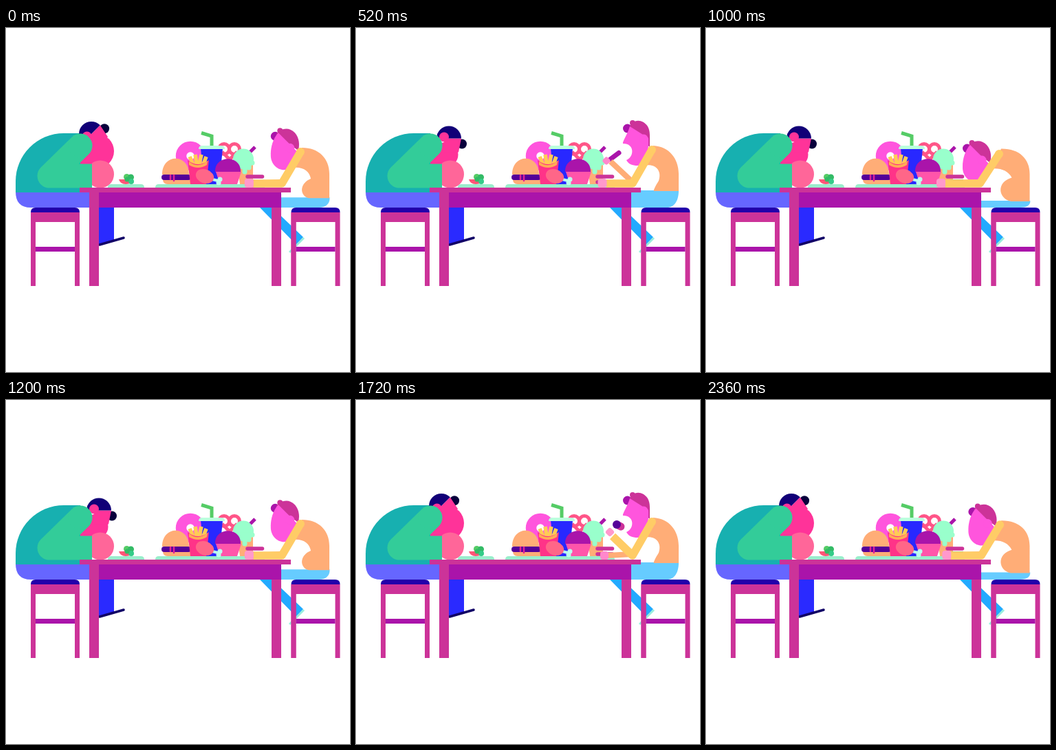
Write an HTML page that moves like this. It is 500 px wide and 500 px high and loops after 2.4 s.

```html
<!DOCTYPE html>
<html>
<head>
<meta charset="utf-8">
<style>
html, body { margin: 0; width: 100%; height: 100%; overflow: hidden; background: #fff; }
svg { display: block; width: 100vw; height: 100vh; }
</style>
</head>
<body>
<svg viewBox="0 0 500 500">
  <defs>
    <g id="stool">
      <path d="M0 268V282H7V375H0ZM64 282V375H71V268H0V282Z" fill="#cc3399"/>
      <path d="M0 268H7V375H0Z" fill="#cc3399"/>
      <path d="M7 318H64V325H7Z" fill="#aa14aa"/>
      <path d="M0 268Q0 261 7 261H64Q71 261 71 268Z" fill="#2200aa"/>
    </g>
    <clipPath id="fistClip"><path d="M125 180H170V232H125Z"/></clipPath>
  </defs>

  <!-- legs under the table -->
  <path d="M135 255H157V309L135 315Z" fill="#2a2aff"/>
  <path d="M136 315L171 305" stroke="#110066" stroke-width="3.5" stroke-linecap="round"/>
  <path d="M369 261H387L432 304L422 315Z" fill="#22aaff"/>
  <path d="M433 305L412 326" stroke="#99eedd" stroke-width="3"/>

  <use href="#stool" x="36"/>
  <use href="#stool" x="414.500"/>

  <!-- large diner -->
  <path d="M14 238H135V261H36Q14 261 14 238Z" fill="#6666ff"/>
  <g id="torsoL"><path d="M14 239V223A70 70 0 0 1 84 153H108L120 180L108 239Z" fill="#17b0b0"/></g>
  <g id="headL">
    <path d="M108 178H128V205H108Z" fill="#ff3399"/>
    <circle id="faceL" fill="#ff3399"/>
    <g id="cap">
      <circle cx="19" cy="8" r="7" fill="#08003c"/>
      <path d="M-7 0H18L14 20H-7Z" fill="#ff3399"/>
      <path d="M-18 0A18 18 0 0 1 18 0Z" fill="#110077"/>
      <circle cx="-7" cy="-2" r="7" fill="#ff3399"/>
    </g>
  </g>
  <g id="armL"><path d="M108 171L63 215H125" fill="none" stroke="#33cc99" stroke-width="35" stroke-linejoin="round"/>
    <circle cx="108" cy="171" r="17.500" fill="#33cc99"/></g>
  <circle cx="137" cy="212.500" r="20" fill="#ff6699" clip-path="url(#fistClip)"/>

  <!-- thin diner, behind the table -->
  <path id="trousers" fill="#66ccff"/>
  <path id="torso" fill="#ffad77"/>
  <g id="head">
    <circle id="quiff" r="6.500" fill="#aa14aa"/>
    <circle id="knot" r="4" fill="#cc3399"/>
    <path id="hair" fill="#cc3399"/>
    <path id="face" fill="#ff55dd"/>
    <circle id="ear" r="6.500" fill="#ff55dd"/>
  </g>

  <!-- table -->
  <path d="M121 239H135V375H121ZM386 239H400V375H386Z" fill="#cc3399"/>
  <path d="M135 239H386V261H135Z" fill="#aa14aa"/>
  <path d="M107 232H414V239H107Z" fill="#cc3399"/>
  <path d="M121 239H400V261H386V239.500H135V261H121Z" fill="#cc3399"/>
  <path d="M135 239H400V261H135Z" fill="#aa14aa"/>
  <path d="M386 261H400V375H386Z" fill="#cc3399"/>

  <!-- salad -->
  <path d="M148 232Q148 227 153 227H196Q201 227 201 232Z" fill="#99eecc"/>
  <circle cx="175.500" cy="216.500" r="4.500" fill="#55cc66"/>
  <circle cx="181.500" cy="217" r="4.500" fill="#33bb66"/>
  <path d="M164 220H184Q184 227 174 227Q166 227 164 220Z" fill="#ff5577"/>
  <circle cx="182" cy="223" r="4" fill="#33cc88"/>
  <circle cx="176" cy="220" r="3.500" fill="#33bb66"/>

  <!-- feast -->
  <path d="M217 232Q217 227 222 227H371Q376 227 376 232Z" fill="#99eecc"/>
  <circle cx="268" cy="186" r="13.500" fill="none" stroke="#ff55dd" stroke-width="15.500"/>
  <g fill="none" stroke="#ff5588" stroke-width="5">
    <circle cx="317" cy="176" r="7.500"/><circle cx="332" cy="176" r="7.500"/>
    <path d="M314 180L330 196M336 180L320 196"/>
  </g>
  <path d="M299 172V157L284 152.500" fill="none" stroke="#55cc66" stroke-width="5"/>
  <path d="M283 175H315L310 227H288Z" fill="#2828ff"/>
  <path d="M280 176Q280 171 285 171H313Q318 171 318 176Z" fill="#bbffdd"/>
  <path d="M227 213C227 182 266 182 266 213ZM228 220H268V227H235Q228 227 228 220Z" fill="#ffad77"/>
  <rect x="226" y="213" width="43" height="8" rx="4" fill="#550099"/>
  <path d="M239 214V220M244 214V222" stroke="#dd2299" stroke-width="2.500" stroke-linecap="round"/>
  <path d="M267 187L274 203M275 184L278 203M284 184L280 203M291 187L285 203" stroke="#ffcc55" stroke-width="5.500"/>
  <path d="M264 192Q279 204 295 192L291 227H268Z" fill="#ff3388"/>
  <path d="M266 194Q279 205 293 193L292 199Q279 207 266 199Z" fill="#ffad55"/>
  <path d="M335 194H359V227H340Z" fill="#ffad77"/>
  <path d="M354 181L362 173" stroke="#aa14aa" stroke-width="5"/>
  <circle cx="345" cy="190.500" r="15" fill="#99ffcc"/>
  <path d="M332 196H358M347 196V209M353 196V203" stroke="#99ffcc" stroke-width="7" stroke-linecap="round"/>
  <path d="M305 209H342L336 227H311Z" fill="#ff55aa"/>
  <path d="M304 209C303 184 342 184 341 209Z" fill="#aa14aa"/>
  <path d="M296 219L308 222" stroke="#bbffee" stroke-width="4"/>
  <circle cx="311" cy="220" r="3.500" fill="#bbffee"/><circle cx="309" cy="225" r="3.500" fill="#bbffee"/>
  <ellipse cx="289" cy="215.500" rx="13.500" ry="10" transform="rotate(20 289 215.500)" fill="#ff6688"/>
  <path id="leaf" d="M355 221H374" stroke="#33bb99" stroke-width="2"/>
  <path d="M351 216H372.500M351 224H372.500" stroke="#cc3399" stroke-width="5.500" stroke-linecap="round"/>

  <!-- arms and bite, in front -->
  <g id="bite">
    <path id="whole" d="M-6 4.500L6 -4.500" stroke="#aa14aa" stroke-width="7" stroke-linecap="round"/>
    <g id="half"><path d="M-2 -1L4 2" stroke="#cc3399" stroke-width="11" stroke-linecap="round"/><circle cx="-2" cy="-1" r="6" fill="#550099"/></g>
  </g>
  <path id="farArm" fill="none" stroke="#ffad77" stroke-width="8"/>
  <g id="farHand" fill="#ff88cc"><rect x="-6" y="-6" width="12" height="12" rx="4"/></g>
  <path id="nearArm" fill="none" stroke="#ffcc66" stroke-width="11.500" stroke-linejoin="round"/>
  <circle id="shoulder" r="6" fill="#ffcc66"/>
  <g id="nearHand" fill="#ff99cc"><rect x="-6.500" y="-6.500" width="13" height="13" rx="4"/></g>
</svg>
<script>
const LOOP = 2400, BEAT = 1200;
const $ = id => document.getElementById(id);
const set = (id, attrs) => { for (const k in attrs) $(id).setAttribute(k, attrs[k]); };
const clamp = (x, a = 0, b = 1) => Math.min(b, Math.max(a, x));
const mix = (a, b, k) => a + (b - a) * k;
const mixPt = (a, b, k) => [mix(a[0], b[0], k), mix(a[1], b[1], k)];
const ease = x => (1 - Math.cos(Math.PI * clamp(x))) / 2;
const ramp = (t, from, to) => ease((t - from) / (to - from));
const move = (id, p, extra = '') => set(id, { transform: `translate(${p})${extra}` });
const show = (id, on) => set(id, { visibility: on ? 'inherit' : 'hidden' });

// Blends two paths that share the same commands.
function blend(a, b, k) {
  const goal = b.match(/[\d.]+/g);
  let i = 0;
  return a.replace(/[\d.]+/g, n => mix(+n, +goal[i++], k).toFixed(2));
}

// [upright, leaning]
const shapes = {
  face: ['M398 143L425 160C426 180 422 200 409 200C402 200 396 198 393 192C404 188 406 168 388 168C387 165 394 156 398 143Z',
         'M396 152L422 178C426 192 418 206 404 206C394 206 385 197 385 185C385 184 385 183 385 182C385 174 388 160 396 152Z'],
  hair: ['M397 147C400 132 416 131 424 143C428 150 427 158 427 173Z',
         'M393 154C399 145 412 143 420 152C427 160 427 170 425 178Z'],
  torso: ['M432 171C455 172 469 190 469 212L469 237L433 237C432 236 435 230 440 222C445 208 436 196 418 200Z',
          'M430 174C455 174 470 190 470 212L470 247L440 247C427 244 426 226 443 219C441 208 432 201 416 203Z'],
  trousers: ['M369 261L395 236L469 236C469 252 462 261 452 261Z',
             'M369 261L395 246L470.5 246C471 256 464 261 455 261Z']
};
const dots = {
  quiff: [[394.5, 146], [391.5, 157]],
  knot: [[402, 138], [398.5, 149]],
  ear: [[418, 161], [413, 174]]
};

function drawLeft(t) {
  const half = t % BEAT;
  const turn = ramp(half, 0, 460);
  const level = t < BEAT ? turn : 1 - turn;
  const puff = Math.sin(Math.PI * turn);
  const grow = `translate(80 239) scale(${1 + .03 * puff} ${1 + .05 * puff}) translate(-80 -239)`;
  set('torsoL', { transform: grow });
  set('armL', { transform: `translate(0 ${-2 * puff})` });
  move('headL', [0, -8 * puff]);
  move('cap', mixPt([124, 154], [135, 160.5], level), `rotate(${-45 * (1 - level)})`);
  set('faceL', { cx: mix(132, 130.5, level), cy: mix(179, 184, level), r: mix(25, 18, level) });
}

function drawRight(t) {
  const beat = t % BEAT;
  const second = t >= BEAT;
  // lean: 0 upright, 1 over the table, 2.5 lowest
  const gap = Math.min(Math.abs(beat - 1000), Math.abs(beat + 200));
  const lean = 2.5 * (1 - ease(gap / 360));
  const bend = clamp(lean), deep = Math.max(0, lean - 1);

  for (const id in shapes) {
    const k = id === 'torso' || id === 'trousers' ? Math.min(lean, 1.5) : bend;
    set(id, { d: blend(...shapes[id], k) });
  }
  for (const id in dots) {
    const [cx, cy] = mixPt(...dots[id], bend);
    set(id, { cx, cy });
  }
  move('head', [-8 * deep, 12 * deep]);
  show('leaf', lean > 1.25);

  const lift = ramp(beat, 130, 400) * (1 - ramp(beat, 580, 770));
  const rest = [mix(358, 353.5, bend) - 8 * deep, 225.5];
  const nearLift = second ? lift : 0, farLift = second ? 0 : lift;

  const top = mixPt([430, 177], [428, 180], Math.min(lean, 2));
  const elbow = [mix(402, 401, bend) - 2 * deep, 226];
  const near = mixPt(rest, [369, 192], nearLift);
  const wrist = mixPt([near[0] + 6, 226], [373, 198], nearLift);
  set('nearArm', { d: `M${top}L${elbow}L${wrist}` });
  set('shoulder', { cx: top[0], cy: top[1] });
  move('nearHand', near, ` rotate(${45 * nearLift}) scale(${1 - .2 * nearLift})`);

  const far = mixPt([rest[0] + 3, 226], [364, 193], farLift);
  const farWrist = mixPt([far[0] + 4, 226], [370, 194], farLift);
  set('farArm', { d: `M${elbow[0]} 224L${farWrist}` });
  move('farHand', far, ` rotate(${45 * farLift}) scale(${1 - .2 * farLift})`);

  const hand = second ? near : far;
  const held = [hand[0] + 12, hand[1] - (second ? 10 : 7)];
  const eaten = ramp(beat, 530, 620);
  move('bite', mixPt(held, [397, 179], eaten), ` scale(${1 - .6 * eaten})`);
  show('bite', beat > 180 && beat < 620);
  show('whole', !second);
  show('half', second);
}

function draw(now) {
  const t = now % LOOP;
  drawLeft(t);
  drawRight(t);
}

const start = performance.now();
function tick() {
  draw(performance.now() - start);
  requestAnimationFrame(tick);
}
tick();
</script>
</body>
</html>
```
